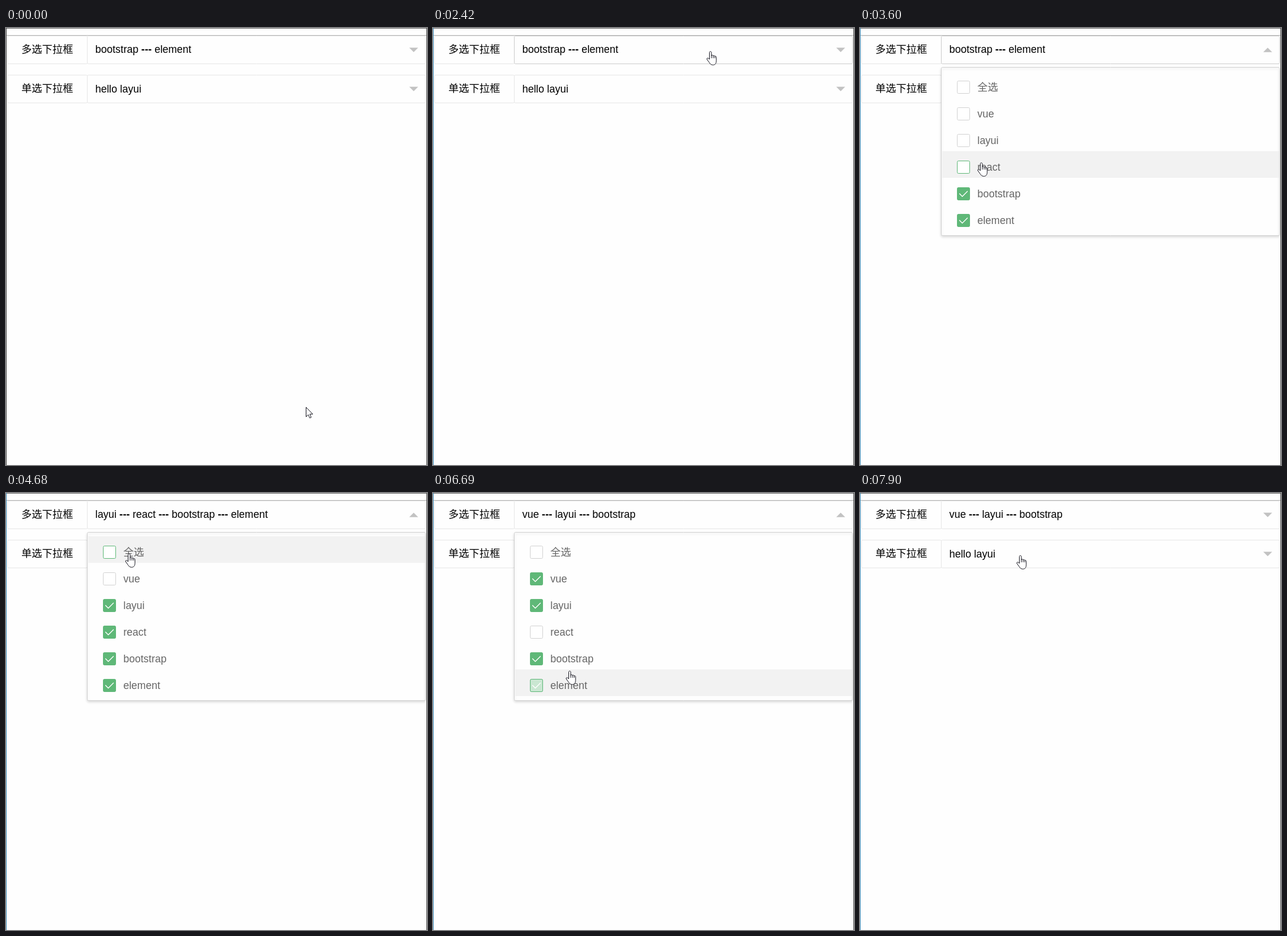
Write an HTML page with a canvas that moves like this. It is 712 by 738 pixels and loops after 8 s.

```html
<!DOCTYPE html>
<html lang="zh">
<head>
<meta charset="utf-8">
<title>Select demo</title>
<style>
html, body { margin: 0; width: 100%; height: 100%; overflow: hidden; background: #fefefe; }
canvas { display: block; }
</style>
</head>
<body>
<canvas id="stage" width="712" height="738"></canvas>
<script>
const ctx = document.getElementById('stage').getContext('2d');
const LOOP = 8000, TICK = 133, PHASE = 6;
const SANS = '"Liberation Sans", Arial, "Noto Sans CJK SC", "Noto Sans CJK", sans-serif';
const CJK = '"Noto Sans CJK SC", "Noto Sans CJK", sans-serif';
const PAGE = '#fefefe', EDGE = '#d2d2d2', GREEN = '#5fb878', DARK = '#4a4a4a';
const FADE = 200, SLIDE = 300, LEAD = 40;
const MENU_TOP = 73, ROW_H = 45;

const options = ['全选', 'vue', 'layui', 'react', 'bootstrap', 'element']
  .map((label, i) => ({ label, on: i > 3, first: i > 3, flips: [] }));

// The visit is scripted in ticks; the calls below fill these.
const moves = [];
let clock = PHASE + 2 * TICK;
let openAt, closeAt;

const rest = ticks => { clock += ticks * TICK; };

function glide(ticks, x, y) {
  moves.push({ start: clock, end: clock + ticks * TICK, x, y });
  rest(ticks);
}

function setOption(opt, on) {
  if (opt.on === on) return;
  opt.on = on;
  opt.flips.push(clock - LEAD);
}

function click(row) {
  const on = !options[row].on;
  if (row === 0) options.forEach(o => setOption(o, on));
  else setOption(options[row], on);
  if (!on) setOption(options[0], false);
}

glide(2, 453, 450);
glide(3, 507, 210);
glide(2, 413, 4);
glide(1, 211, 30);
const enterAt = clock;
glide(2, 462, 39);
rest(6);
const focusAt = clock;
rest(2);
openAt = clock - LEAD;
glide(4, 239, 208);
glide(3, 198, 227);
rest(1);
click(3);
const blurAt = clock;
rest(1);
glide(3, 201, 190);
click(2);
glide(3, 201, 102);
rest(2);
click(0);
glide(2, 237, 279);
glide(2, 199, 212);
rest(2);
click(3);
glide(5, 224, 300);
rest(1.3);
click(5);
rest(.7);
glide(4, 252, 405);
rest(2);
closeAt = clock - LEAD;
glide(1, 262, 352);
glide(2, 264, 105);

const arrow = new Path2D('M.5 .5V16.6L4.2 13.1L6.7 18.6L9.2 17.5L6.8 12.1H11.8Z');
const hand = new Path2D('M5 14V2.4C5 .1 8.4 .1 8.4 2.4V8C8.4 6.3 11.5 6.4 11.5 8.4C11.7 7.1 14.3 7.3 14.3 9.2' +
  'C14.6 8.2 16.6 8.4 16.6 10.4V16.5C16.6 21 14.5 23.4 11 23.4C7.5 23.4 6.2 21.5 4.8 19.4L.9 14C0 12.2 2 11 3.3 12.2Z');
const knuckles = new Path2D('M8.4 8V12M11.5 8.4V12M14.3 9.2V12');

const progress = (t, start, length) => Math.min(1, Math.max(0, (t - start) / length));
const lerp = (a, b, k) => a + (b - a) * k;

function pointerAt(t) {
  let x = 507, y = 640;
  for (const m of moves) {
    const k = progress(t, m.start, m.end - m.start);
    x = lerp(x, m.x, k);
    y = lerp(y, m.y, k);
  }
  return { x: Math.round(x), y: Math.round(y) };
}

function optionAt(opt, t) {
  const past = opt.flips.filter(f => f <= t);
  const on = opt.first !== (past.length % 2 === 1);
  const k = past.length ? progress(t, past.at(-1), FADE) : 1;
  return { on, fill: on ? k : 1 - k };
}

function rect(x, y, w, h, color) {
  ctx.fillStyle = color;
  ctx.fillRect(x, y, w, h);
}

function frame(x, y, w, h, stroke, fill) {
  ctx.beginPath();
  ctx.roundRect(x + .5, y + .5, w - 1, h - 1, 2);
  ctx.fillStyle = fill;
  ctx.fill();
  ctx.strokeStyle = stroke;
  ctx.lineWidth = 1;
  ctx.stroke();
}

function text(str, x, y, color, family = SANS, weight = '') {
  ctx.font = `${weight} 17.5px ${family}`;
  ctx.fillStyle = color;
  ctx.fillText(str, x, y);
  return x + ctx.measureText(str).width;
}

function drawWindow(t) {
  rect(0, 0, 712, 738, PAGE);
  rect(0, 0, 712, 1, '#666');
  rect(1, 12, 710, 1, '#b4b4b4');
  rect(711, 0, 1, 738, DARK);
  rect(0, 0, 1, 738, t >= focusAt ? '#3c8dbc' : DARK);
}

function drawCaret(y, turn) {
  ctx.save();
  ctx.translate(689.5, y);
  ctx.rotate(turn * Math.PI);
  ctx.beginPath();
  ctx.moveTo(-7.5, -3.7);
  ctx.lineTo(7.5, -3.7);
  ctx.lineTo(0, 3.8);
  ctx.fillStyle = '#c2c2c2';
  ctx.fill();
  ctx.restore();
}

function drawRow(y, label, hover, turn) {
  const tone = lerp(230, 204, hover);
  frame(2, y, 136, 48, '#e6e6e6', PAGE);
  frame(137, y, 573, 48, `rgb(${tone} ${tone} ${tone})`, PAGE);
  text(label, 26, y + 29, '#000', CJK);
  drawCaret(y + 24, turn);
}

function drawValue(t) {
  let x = 151;
  options.slice(1).filter(o => optionAt(o, t).on).forEach((o, i) => {
    if (i) x = text(' --- ', x, 42, '#000', SANS, 'bold');
    x = text(o.label, x, 42, '#000');
  });
}

function drawCheckbox(y, fill, hovered) {
  frame(164, y - 11, 22, 22, hovered ? GREEN : EDGE, '#fff');
  if (!fill) return;
  ctx.save();
  ctx.globalAlpha *= fill;
  frame(164, y - 11, 22, 22, GREEN, GREEN);
  ctx.restore();
  ctx.beginPath();
  ctx.moveTo(168, y - .5);
  ctx.lineTo(173, y + 4.5);
  ctx.lineTo(182, y - 4.5);
  ctx.strokeStyle = '#fff';
  ctx.lineWidth = 1.3;
  ctx.stroke();
}

function drawMenu(t, pointerY) {
  const ease = 1 - (1 - progress(t, openAt, SLIDE)) ** 2;
  const row = Math.floor((pointerY - MENU_TOP) / ROW_H);
  ctx.save();
  ctx.globalAlpha = lerp(.3, 1, ease);
  ctx.translate(0, lerp(30, 0, ease));
  ctx.shadowColor = 'rgba(0,0,0,.14)';
  ctx.shadowBlur = 4;
  ctx.shadowOffsetY = 2;
  frame(137, 66, 573, 285, EDGE, PAGE);
  ctx.shadowColor = 'transparent';
  options.forEach((o, i) => {
    const top = MENU_TOP + i * ROW_H;
    if (i === row) rect(139, top, 570, ROW_H, '#f2f2f2');
    drawCheckbox(top + 27, optionAt(o, t).fill, i === row);
    text(o.label, 198.5, top + 33, '#666');
  });
  ctx.restore();
}

function drawPointer(x, y, isHand) {
  const shape = isHand ? hand : arrow;
  ctx.save();
  ctx.translate(isHand ? x + .5 : x, y);
  ctx.fillStyle = '#fff';
  ctx.strokeStyle = '#14141e';
  ctx.lineWidth = 1;
  ctx.fill(shape);
  ctx.stroke(shape);
  if (isHand) ctx.stroke(knuckles);
  ctx.restore();
}

function draw(now) {
  const t = Math.floor((now % LOOP - PHASE) / TICK) * TICK + PHASE;
  const { x, y } = pointerAt(t);
  const opened = t >= openAt && t < closeAt;
  const hover = t < enterAt ? 0 : 1 - progress(t, blurAt, 250);
  const turn = progress(t, openAt, SLIDE) - progress(t, closeAt, SLIDE);
  const overField = (y > 12 && y < 61) || (y > 79 && y < 127);
  const overMenu = opened && y > 66 && y < 351;
  drawWindow(t);
  drawRow(13, '多选下拉框', hover, turn);
  drawValue(t);
  drawRow(79, '单选下拉框', 0, 0);
  text('hello layui', 151, 109, '#000');
  if (opened) drawMenu(t, y);
  drawPointer(x, y, overField || overMenu);
}

const start = performance.now();
function tick() {
  draw(performance.now() - start);
  requestAnimationFrame(tick);
}
tick();
</script>
</body>
</html>
```
